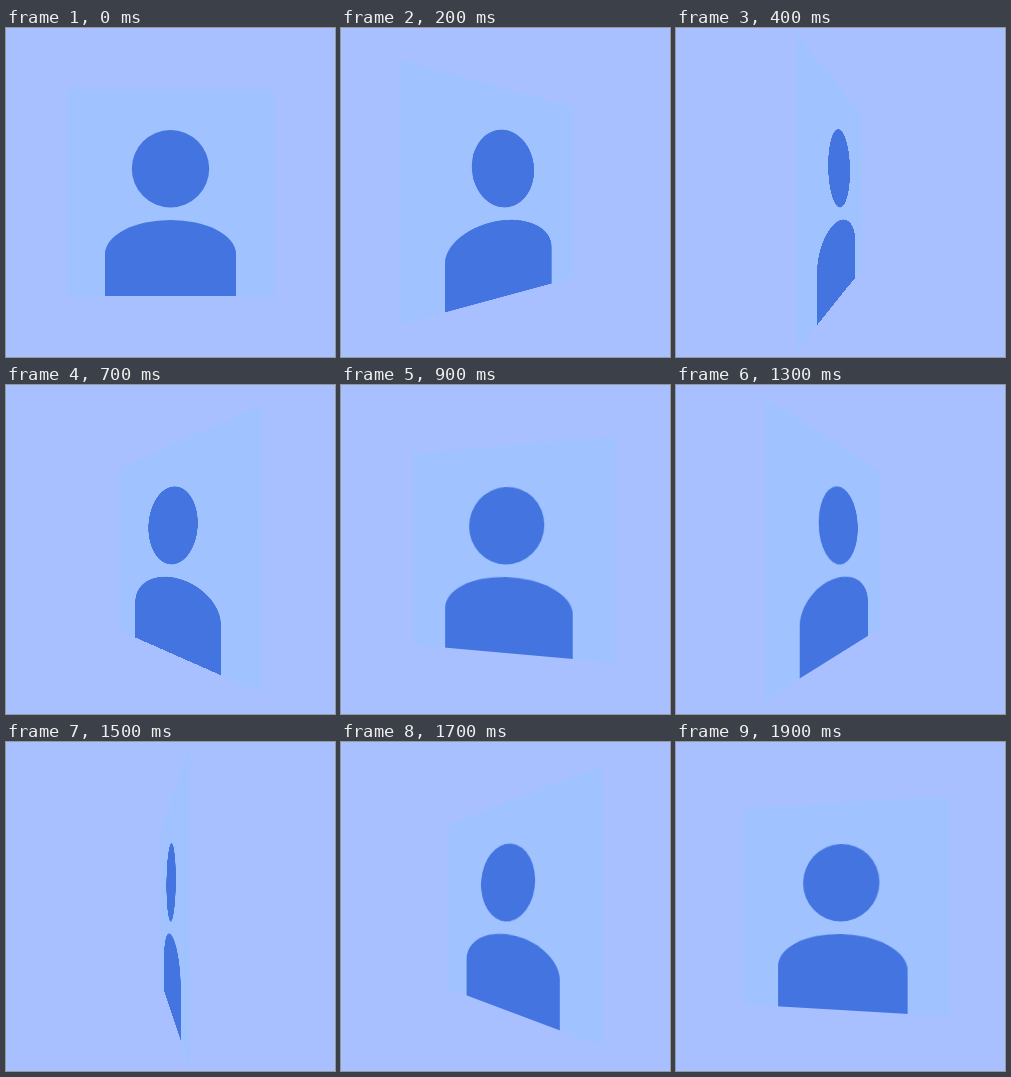
These frames come from a looping animation (329 by 329 pixels, 1.95 s). An HTML page:

```html
<!DOCTYPE html>
<html lang="en">
<head>
<meta charset="utf-8">
<title>Turning avatar</title>
<style>
  html, body { margin: 0; width: 100%; height: 100%; overflow: hidden; background: #a8c0ff; }
  body { position: relative; }
  .stage { position: absolute; left: 0; top: 0; width: 329px; height: 329px; perspective: 287px; }
  svg { display: block; width: 329px; height: 329px; }
</style>
</head>
<body>
<div class="stage">
  <svg id="card" viewBox="0 0 329 329">
    <rect x="61" y="60.5" width="207.5" height="207.5" fill="#a0c3ff"/>
    <g fill="#4374e0">
      <circle cx="164.5" cy="140.7" r="38.7"/>
      <path d="M99 268V226A65.5 34 0 0 1 230 226V268Z"/>
    </g>
  </svg>
</div>
<script>
  const LOOP = 1950, STEP = 50;
  const card = document.getElementById('card');
  const start = performance.now();

  function draw() {
    const t = Math.max(0, performance.now() - start) % LOOP;
    const angle = Math.floor(t / STEP) * STEP / LOOP * 360;
    card.style.transform = `rotateY(${angle}deg)`;
    requestAnimationFrame(draw);
  }
  draw();
</script>
</body>
</html>
```
